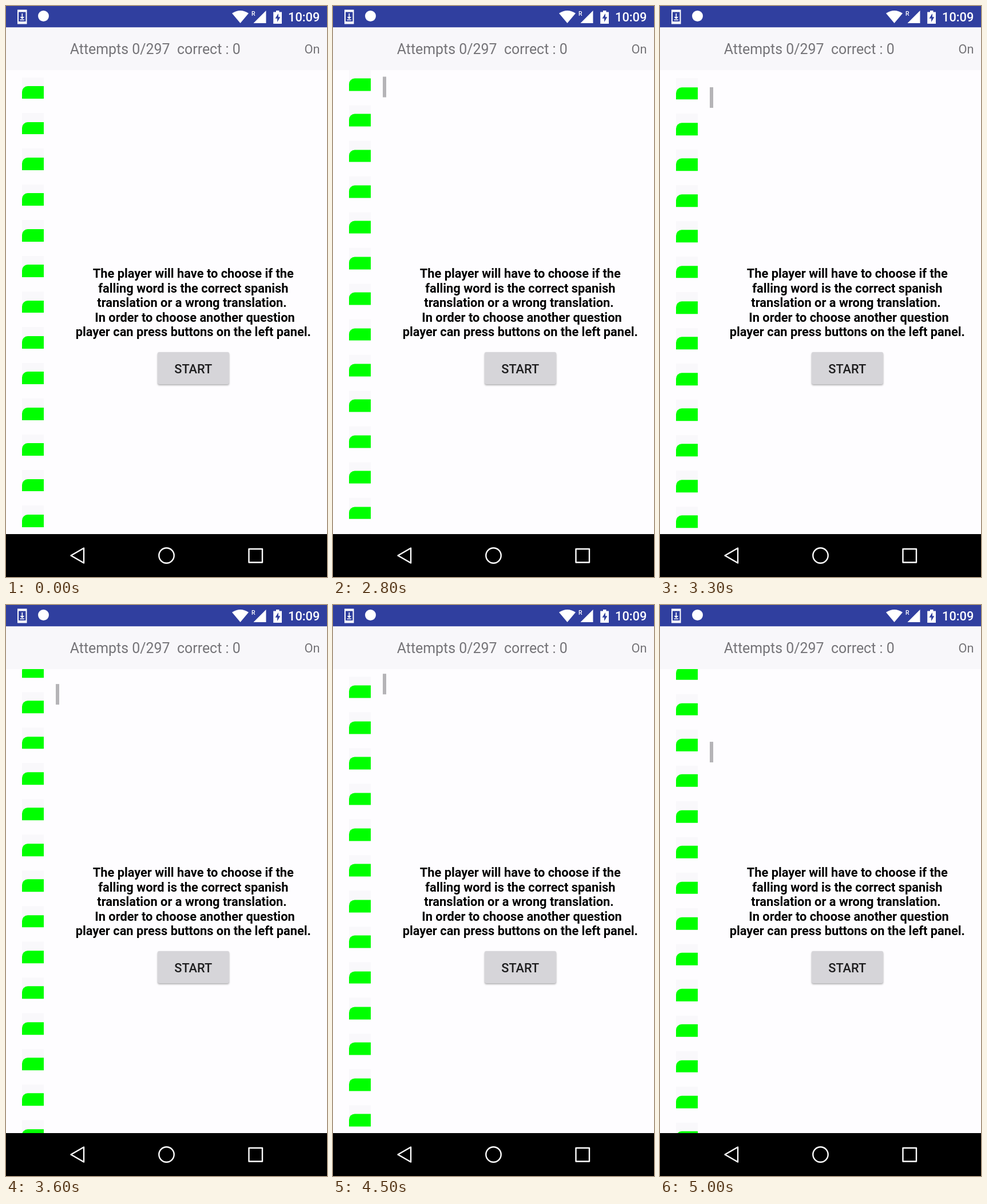
An HTML page for the animation above (5.1 s loop, 561 px wide and 998 px high).

```html
<!DOCTYPE html>
<html lang="en">
<head>
<meta charset="utf-8">
<title>Word game start screen</title>
<style>
@property --scroll { syntax: '<number>'; inherits: true; initial-value: 0; }

html, body { margin: 0; width: 100%; height: 100%; overflow: hidden; background: #fefdff; }

.panel {
  position: absolute; left: 0; top: 112px; width: 110px; height: 811px; overflow: hidden;
  animation: scroll 5.1s infinite;
}
.list {
  position: absolute; left: 28px; top: 12.7px; width: 37.6px;
  transform: translateY(calc(var(--scroll) * -1px));
}
.list i {
  display: block; position: relative; height: 37.4px; margin-bottom: 25px; background: #f9f8fb;
}
.list i::after {
  content: ''; position: absolute; inset: 15.6px 0 0;
  background: #0f0; border-radius: 10px 0 0;
}
.thumb {
  position: absolute; left: 87px; top: 0; width: 6.4px; height: 35.5px; background: #b5b4b7;
  transform: translateY(calc(var(--scroll) * .0438px));
  animation: show 5.1s step-end infinite;
}

/* The list moves in ticks of 100 ms. */
@keyframes scroll {
  0%       { --scroll: 0;     animation-timing-function: step-end; }
  49.0196% { --scroll: 50.4;  animation-timing-function: steps(5); }
  58.8235% { --scroll: 405.5; animation-timing-function: steps(3); }
  64.7058% { --scroll: 684.8; animation-timing-function: steps(2); }
  68.6274% { --scroll: 730;   animation-timing-function: steps(3); }
  74.5098% { --scroll: 330;   animation-timing-function: step-end; }
  78.4313% { --scroll: 294.8; animation-timing-function: steps(5); }
  88.2352% { --scroll: 186.6; animation-timing-function: step-end; }
  90.196%  { --scroll: 330;   animation-timing-function: step-end; }
  92.1568% { --scroll: 900;   animation-timing-function: step-end; }
  94.1176% { --scroll: 1650;  animation-timing-function: step-end; }
  96.0784% { --scroll: 2320;  animation-timing-function: step-end; }
  98.0392%, 100% { --scroll: 2901.2; animation-timing-function: step-end; }
}
@keyframes show {
  0% { opacity: 0; }
  49.0196%, 100% { opacity: 1; }
}

.button {
  position: absolute; left: 265px; top: 605px; width: 124.5px; height: 56px;
  background: #d6d5d9; border-radius: 3px;
  box-shadow: 0 2px 3px rgba(0, 0, 0, .28), 0 0 2px rgba(0, 0, 0, .1);
}
svg { position: absolute; left: 0; top: 0; }
text { font: 21.82px Roboto, sans-serif; white-space: pre; }
.grey { fill: #757478; }
.score { font-size: 24.93px; }
.help { font-weight: 700; text-anchor: middle; }
.label { font-weight: 500; text-anchor: middle; fill: #1d1d1e; }
.clock { font-weight: 500; fill: #fff; }
.line { fill: none; stroke: #fff; stroke-width: 2.4; stroke-linejoin: round; }
</style>
</head>
<body>
<div class="panel">
  <div class="list" id="list"></div>
  <div class="thumb"></div>
</div>
<div class="button"></div>

<svg width="561" height="998" viewBox="0 0 561 998">
  <rect width="561" height="37.5" fill="#303f9f"/>
  <rect y="37.5" width="561" height="74.5" fill="#f8f7fa"/>
  <rect y="923" width="561" height="75"/>

  <!-- status bar -->
  <g fill="#fff">
    <path d="M20 6.5h16.5v25H20zM22 10.5v16.5h12.500v-16.500z" fill-rule="evenodd"/>
    <path d="M27.500 13h1.600v6h3l-3.800 4-3.800-4h3zM24.500 23.500h7.500v1.500h-7.500z"/>
    <circle cx="65.500" cy="17.500" r="9.500"/>
    <path d="M409.500 30L395 12.800Q409.500 3.200 424 12.800Z"/>
    <path d="M454.500 8v22h-22z"/>
    <path d="M472 8h5.500v2.500h4.500v20.500h-14.800v-20.500h4.800z"/>
    <text x="429" y="16.800" style="font-size:10.500px;font-weight:500">R</text>
  </g>
  <path d="M476 13l-5.500 8.800h3.600v6.200l5.300-8.800h-3.400z" fill="#303f9f"/>
  <text class="clock" x="493" y="27">10:09</text>

  <!-- header -->
  <text class="grey score" x="111.700" y="84.300">Attempts 0/297  correct : 0</text>
  <text class="grey" x="521.500" y="83.300">On</text>

  <!-- instructions -->
  <g class="help">
    <text class="help" x="327.300" y="475">The player will have to choose if the</text>
    <text class="help" x="327.300" y="500.500">falling word is the correct spanish</text>
    <text class="help" x="325" y="526">translation or a wrong translation.</text>
    <text class="help" x="330" y="551.600">In order to choose another question</text>
    <text class="help" x="327.300" y="577.200">player can press buttons on the left panel.</text>
  </g>
  <text class="label" x="327.300" y="641.500">START</text>

  <!-- navigation bar -->
  <g class="line">
    <path d="M113.500 960.500L136 947.500v26z"/>
    <circle cx="280.500" cy="960.500" r="13.200"/>
    <rect x="424.500" y="949" width="23.500" height="23.500"/>
  </g>
</svg>

<script>
document.getElementById('list').innerHTML = '<i></i>'.repeat(64);
</script>
</body>
</html>
```
